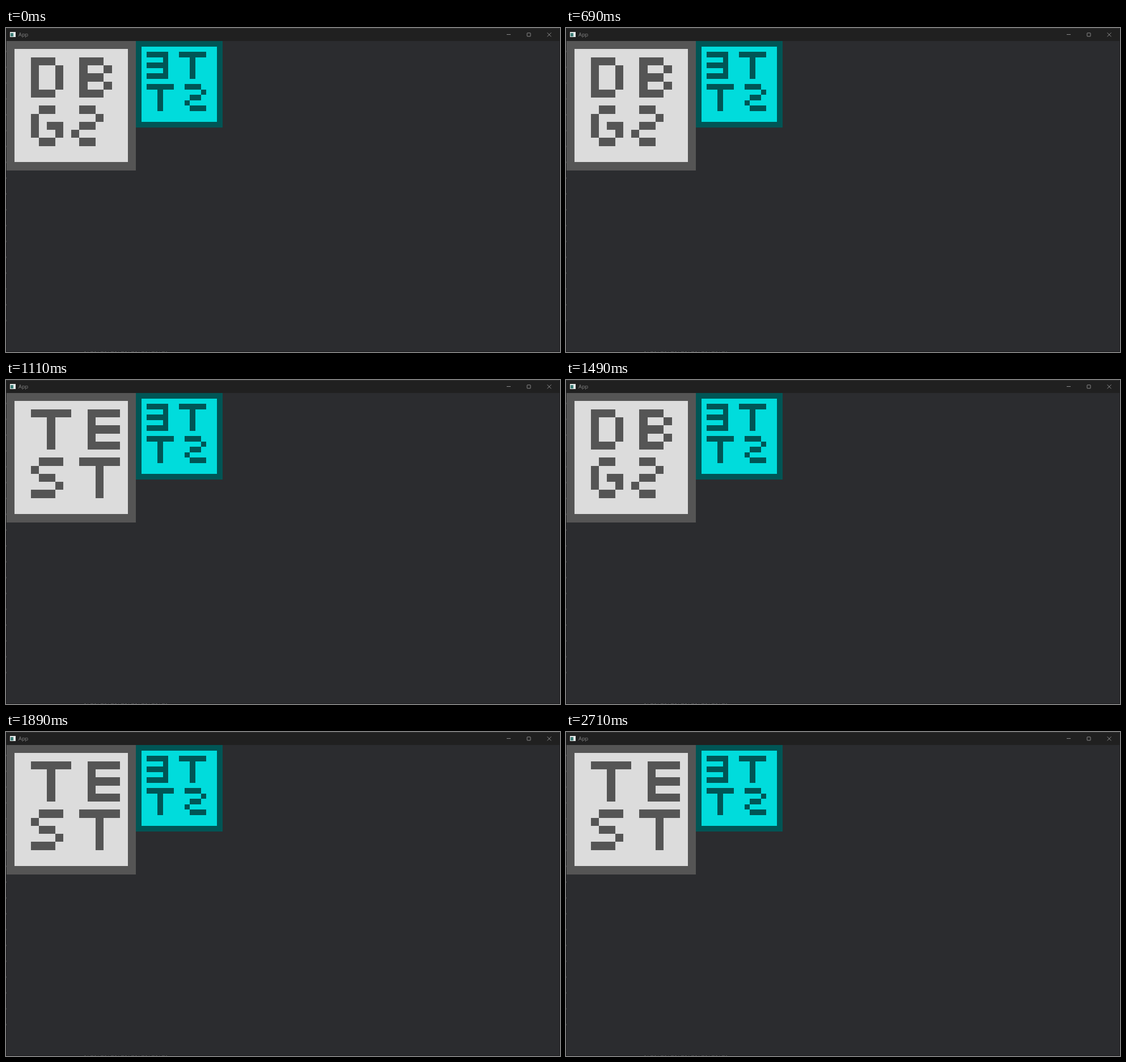
Recreate the animation shown at these times as an HTML page. Size 977 by 573 pixels, loop 2860 ms.

```html
<!DOCTYPE html>
<html lang="en">
<head>
<meta charset="utf-8">
<title>App</title>
<style>
  html, body { margin: 0; width: 100%; height: 100%; overflow: hidden; background: #2b2c2f; }
  svg { display: block; width: 977px; height: 573px; }
  text { font: 9.3px "Open Sans", "Noto Sans", sans-serif; fill: #858585; }
</style>
</head>
<body>
<svg viewBox="0 0 977 573">
  <rect width="977" height="573" fill="#2b2c2f"/>
  <rect width="977" height="23" fill="#202020"/>
  <path d="M0 .5H977" stroke="#333"/>
  <path d="M.5 0V573M976.5 0V573M0 572.5H977" stroke="#1c1c1e"/>
  <path d="M.5 40V540" stroke="#3c3c3e" stroke-dasharray="3 25"/>
  <path d="M138 572.5H284" stroke="#454547" stroke-dasharray="3 3 1 4 5 2"/>

  <g shape-rendering="crispEdges">
    <rect x="7" y="7" width="10" height="9" fill="#e4e8e8"/>
    <rect x="8" y="9" width="5" height="6" fill="#3f7f78"/>
  </g>
  <text x="22" y="15.3">App</text>
  <g fill="none" stroke="#989898" stroke-width=".9">
    <path d="M883 11.5h7"/>
    <rect x="919" y="8.8" width="6" height="6" rx=".6"/>
    <path d="M954.5 8.3l7 7m0-7l-7 7"/>
  </g>

  <g id="tiles" shape-rendering="crispEdges"></g>
</svg>
<script>
const GLYPHS = {
  T: "M0 0h5v1H3v4H2V1H0z",
  E: "M0 0h4v1H1v1h3v1H1v1h3v1H0z",
  S: "M1 0h3v1H1zM0 1h1v1H0zM1 2h2v1H1zM3 3h1v1H3zM0 4h3v1H0z",
  D: "M0 0h3v1H1v3h2v1H0zM3 1h1v3H3z",
  B: "M0 0h3v1H1v1h2v1H1v1h2v1H0zM3 1h1v1H3zM3 3h1v1H3z",
  G: "M1 0h2v1H1zM0 1h1v3H0zM2 2h2v2H3V3H2zM1 4h2v1H1z",
  1: "M1 0h1v4h1v1H0V4h1V2H0V1h1z",
  2: "M1 0h2v1H1zM3 1h1v1H3zM1 2h2v1H1zM0 3h1v1H0zM1 4h2v1H1z"
};

// Each letter: glyph, column, row on the 16 x 16 tile grid.
const LABELS = {
  TEST: [["T", 3, 2], ["E", 10, 2], ["S", 3, 8], ["T", 9, 8]],
  DBG1: [["D", 3, 2], ["B", 9, 2], ["G", 3, 8], ["1", 8, 8]],
  DBG2: [["D", 3, 2], ["B", 9, 2], ["G", 3, 8], ["2", 8, 8]]
};

const LOOP = 2860;
const CYCLE = ["DBG2", "", "TEST", "DBG1"]; // the empty cell shows the background
const CHANGES = [90, 320, 510, 690, 880, 1110, 1300, 1490, 1690, 1890, 2090, 2330, 2480, 2710];

const tiles = document.getElementById("tiles");

function addTile(label, transform, dark, light) {
  const tile = document.createElementNS("http://www.w3.org/2000/svg", "g");
  tile.setAttribute("transform", transform);
  const letters = LABELS[label].map(([glyph, x, y]) =>
    `<path transform="translate(${x} ${y})" d="${GLYPHS[glyph]}" fill="${dark}"/>`);
  tile.innerHTML = `<rect width="16" height="16" fill="${dark}"/>
    <rect x="1" y="1" width="14" height="14" fill="${light}"/>${letters.join("")}`;
  tiles.append(tile);
  return tile;
}

const animated = Object.keys(LABELS).map(label => ({
  label,
  tile: addTile(label, "translate(.9 23.1) scale(14.28)", "#555", "#dcdcdc")
}));
addTile("TEST", "translate(381.6 23.2) scale(-9.52 9.52)", "#005555", "#00dcdc");

function draw(time) {
  const step = CHANGES.filter(t => t <= time).length;
  const current = CYCLE[step % CYCLE.length];
  for (const { label, tile } of animated)
    tile.setAttribute("visibility", label === current ? "visible" : "hidden");
}

const start = performance.now();
function tick() {
  draw((performance.now() - start) % LOOP);
  requestAnimationFrame(tick);
}
tick();
</script>
</body>
</html>
```
